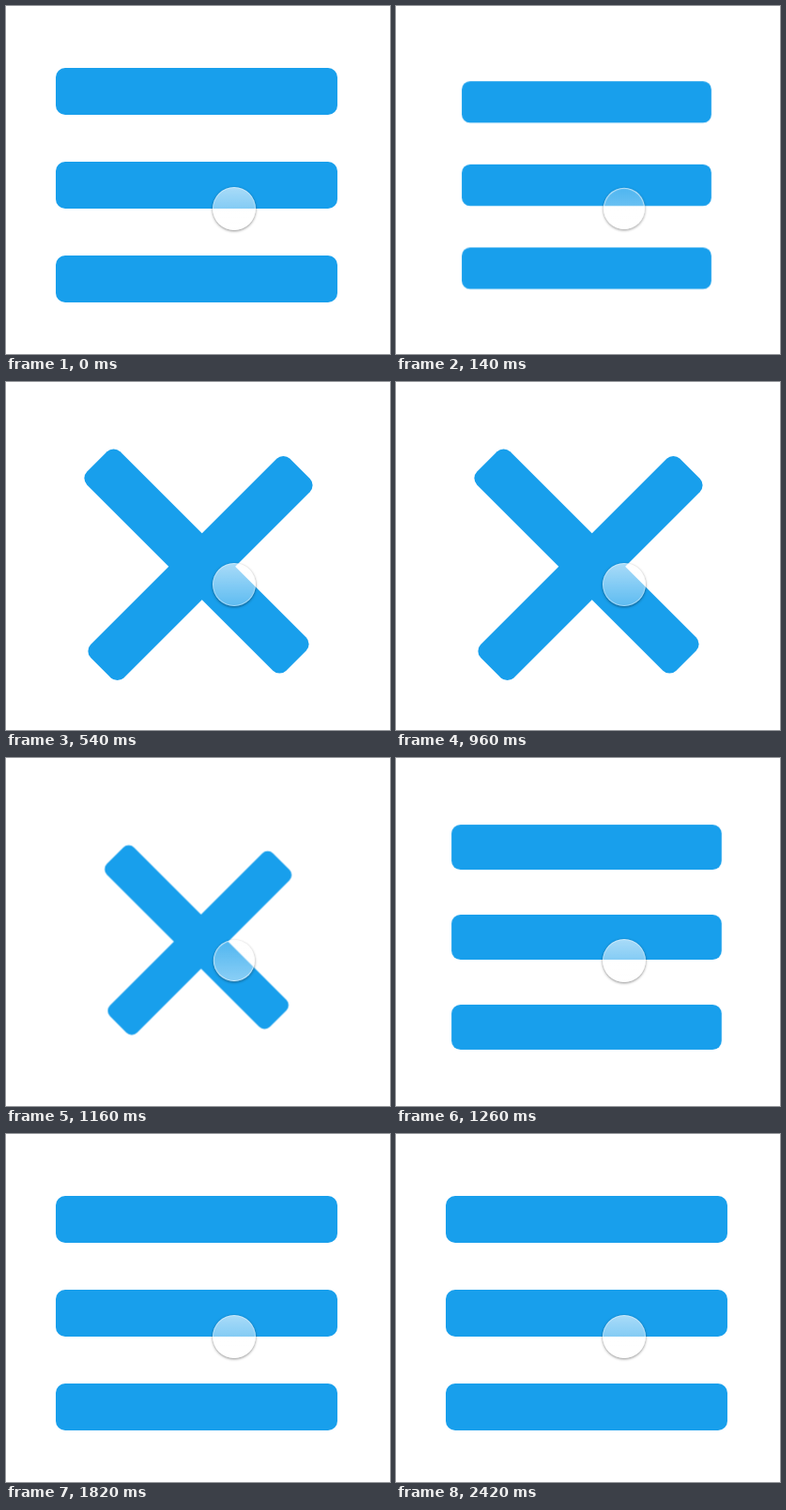
An HTML page for the animation above (2980 ms loop, 409x371 px).

```html
<!DOCTYPE html>
<html lang="en">
<head>
<meta charset="utf-8">
<title>Menu toggle</title>
<style>
  html, body {
    margin: 0;
    width: 100%;
    height: 100%;
    overflow: hidden;
    background: #fff;
  }

  svg {
    position: absolute;
    left: 0;
    top: 0;
    fill: #189fec;
  }

  .icon, .menu, .close, .pointer, .pointer::before {
    animation: 2980ms infinite;
  }
  .icon {
    transform-origin: 203px 191px;
    animation-name: press;
  }
  .menu { animation-name: menu; }
  .close { animation-name: close; }

  /* Presses at 75 and 1035 ms, each released after 135 ms: shrink, swap, grow back. */
  @keyframes press {
    0%, 2.517%, 34.732% {
      transform: scale(1);
      animation-timing-function: cubic-bezier(.31, .09, .36, .77);
    }
    7.047%, 39.262% {
      transform: scale(.814);
      animation-timing-function: ease;
    }
    13.423%, 45.638%, 100% { transform: scale(1); }
  }
  @keyframes menu {
    0%, 39.262% { visibility: visible; animation-timing-function: step-end; }
    7.047% { visibility: hidden; animation-timing-function: step-end; }
    100% { visibility: visible; }
  }
  @keyframes close {
    0%, 39.262% { visibility: hidden; animation-timing-function: step-end; }
    7.047% { visibility: visible; animation-timing-function: step-end; }
    100% { visibility: hidden; }
  }

  .pointer {
    --light: rgba(255, 255, 255, .63);
    --dim: rgba(255, 255, 255, .3);
    position: absolute;
    left: 220px;
    top: 193px;
    width: 46px;
    height: 46px;
    box-sizing: border-box;
    border: 1px solid rgba(255, 255, 255, .4);
    border-radius: 50%;
    background: linear-gradient(var(--light), var(--dim)) border-box;
    box-shadow: 0 1px 3px rgba(0, 0, 0, .45);
    animation-name: tap;
  }
  /* While held down, the pointer is smaller and its shading is reversed. */
  @keyframes tap {
    0%, 9.228%, 41.443%, 100% {
      transform: none;
      background: linear-gradient(var(--light), var(--dim)) border-box;
      border-color: rgba(255, 255, 255, .4);
      animation-timing-function: step-end;
    }
    2.517%, 34.732% {
      transform: scale(.96);
      background: linear-gradient(rgba(255, 255, 255, .24), rgba(255, 255, 255, .5)) border-box;
      border-color: rgba(255, 255, 255, .7);
      animation-timing-function: step-end;
    }
  }
</style>
</head>
<body>
<svg width="409" height="371" viewBox="0 0 409 371">
  <defs>
    <rect id="bar" x="-150" y="-25" width="300" height="50" rx="10"/>
  </defs>
  <g class="icon">
    <g class="menu">
      <use href="#bar" x="203" y="91"/>
      <use href="#bar" x="203" y="191"/>
      <use href="#bar" x="203" y="291"/>
    </g>
    <g class="close">
      <use href="#bar" transform="translate(203 191) rotate(45)"/>
      <use href="#bar" transform="translate(207 198.5) rotate(-45)"/>
    </g>
  </g>
</svg>
<div class="pointer"></div>
</body>
</html>
```
